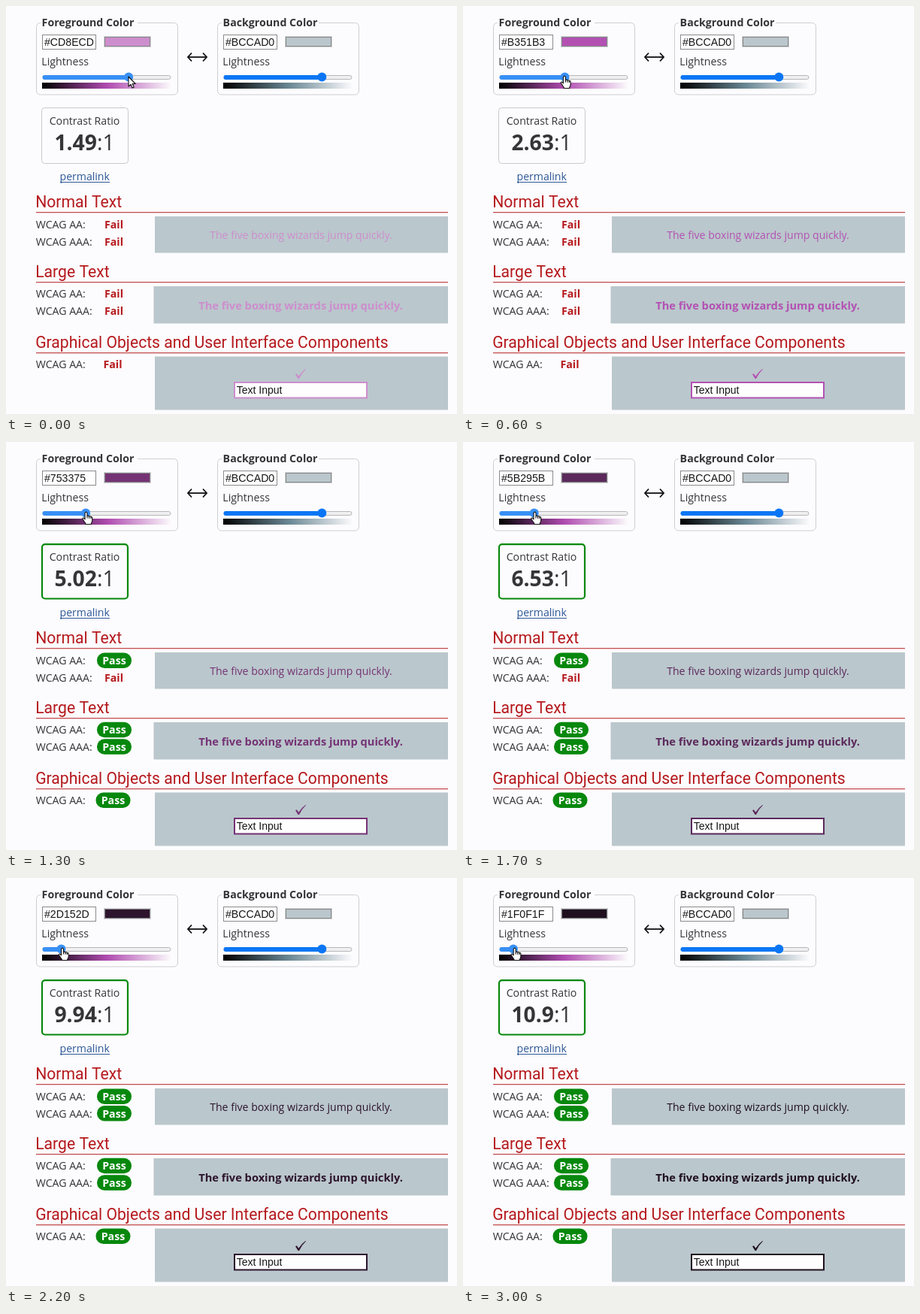
Write an HTML page with a canvas that moves like this. It is 600 px wide and 543 px high and loops after 3.1 s.

```html
<!DOCTYPE html>
<html lang="en">
<head>
<meta charset="utf-8">
<title>Contrast checker</title>
<style>
html, body { margin: 0; width: 100%; height: 100%; overflow: hidden; background: #fcfbfd; }
canvas { display: block; }
</style>
</head>
<body>
<canvas id="stage" width="600" height="543"></canvas>
<script>
const ctx = document.getElementById('stage').getContext('2d');
const LOOP = 3100, STEP = 100;
const PAGE = '#fcfbfd', INK = '#353537', RED = '#b5191d', GREEN = '#07880d';
const BACK_RGB = [188, 202, 208], BACK = '#bac7cc';
const SANS = '"Open Sans", sans-serif', HEAD = 'Roboto, sans-serif';
const FIELD = '"Liberation Sans", Arial, sans-serif';
const SENTENCE = 'The five boxing wizards jump quickly.';

// time in ms, lightness in percent, saturation
const KEYS = [
  [0, 68, .386], [300, 60, .392], [900, 42, .392], [1300, 33, .392],
  [1700, 26, .377], [2200, 13, .36], [3000, 9, .35]
];

function sample(t) {
  const i = Math.max(1, KEYS.findIndex(key => key[0] >= t));
  const a = KEYS[i - 1], b = KEYS[i];
  const u = (t - a[0]) / (b[0] - a[0]);
  return [Math.round(a[1] + (b[1] - a[1]) * u) / 100, a[2] + (b[2] - a[2]) * u];
}

function purple(light, sat) {
  const spread = sat * Math.min(light, 1 - light);
  const high = Math.round((light + spread) * 255);
  const low = Math.round((light - spread) * 255);
  return [high, low, high];
}

const toHex = rgb => '#' + rgb.map(v => v.toString(16).padStart(2, '0')).join('').toUpperCase();

function luminance(rgb) {
  const [r, g, b] = rgb.map(v => {
    v /= 255;
    return v <= .03928 ? v / 12.92 : ((v + .055) / 1.055) ** 2.4;
  });
  return .2126 * r + .7152 * g + .0722 * b;
}

const contrast = rgb =>
  Math.floor((luminance(BACK_RGB) + .05) / (luminance(rgb) + .05) * 100) / 100;

function text(str, x, y, color = INK, font = '14.1px ' + SANS, align = 'left') {
  ctx.font = font;
  ctx.fillStyle = color;
  ctx.textAlign = align;
  ctx.fillText(str, x, y);
}

function rect(x, y, w, h, color) {
  ctx.fillStyle = color;
  ctx.fillRect(x, y, w, h);
}

function rounded(x, y, w, h, r, fill, stroke, width = 1) {
  ctx.beginPath();
  ctx.roundRect(x, y, w, h, r);
  if (fill) { ctx.fillStyle = fill; ctx.fill(); }
  if (stroke) { ctx.strokeStyle = stroke; ctx.lineWidth = width; ctx.stroke(); }
}

function line(points, color, width) {
  ctx.beginPath();
  points.forEach(([x, y]) => ctx.lineTo(x, y));
  ctx.strokeStyle = color;
  ctx.lineWidth = width;
  ctx.stroke();
}

function slider(x, thumb, color) {
  rounded(x + .5, 92.5, 170, 5, 2.5, '#efeff0', '#b6b6b8');
  rounded(x, 92, thumb - x, 6, 3, color);
  ctx.beginPath();
  ctx.arc(thumb, 94.5, 6, 0, Math.PI * 2);
  ctx.fill();
}

function colorPanel(x, title, hex, swatch, middle, thumb, accent) {
  rounded(x + .5, 22.5, 188, 95.5, 5, null, '#cfced2');
  rect(x + 6, 20, 129, 5, PAGE);
  text(title, x + 7.6, 27, INK, 'bold 14.2px ' + SANS);

  rect(x + 8, 38, 72, 20, '#8a8a8c');
  rect(x + 9, 39, 70, 18, '#fff');
  ctx.save();
  ctx.beginPath();
  ctx.rect(x + 9, 39, 67.5, 18);
  ctx.clip();
  text(hex, x + 11, 53, '#161616', '14.15px ' + FIELD);
  ctx.restore();

  rect(x + 90, 40, 63, 15, '#d3d3d6');
  rect(x + 91, 41, 61, 13, '#858588');
  rect(x + 92, 42, 59, 11, swatch);

  text('Lightness', x + 7.3, 79, INK, '14.2px ' + SANS);
  const ramp = ctx.createLinearGradient(x + 8, 0, x + 180, 0);
  ramp.addColorStop(0, '#000');
  ramp.addColorStop(.5, middle);
  ramp.addColorStop(1, PAGE);
  rect(x + 8, 102, 172, 8, ramp);
  slider(x + 8.5, thumb, accent);
}

function swapArrow() {
  line([[242, 68], [267, 68]], '#111', 1.8);
  line([[247, 62.5], [242, 68], [247, 73.5]], '#111', 1.8);
  line([[262, 62.5], [267, 68], [262, 73.5]], '#111', 1.8);
}

function ratioBox(ratio) {
  if (ratio >= 4.5) rounded(48, 136.2, 114, 72.3, 4, null, GREEN, 2.2);
  else rounded(47.5, 135.5, 115, 74, 4, null, '#c9c9cc');
  text('Contrast Ratio', 104.5, 158, INK, '14.15px ' + SANS, 'center');

  const bold = 'bold 28.3px ' + SANS, plain = '28.3px ' + SANS;
  const value = String(ratio);
  ctx.font = bold;
  const valueWidth = ctx.measureText(value).width;
  ctx.font = plain;
  const left = 104.5 - (valueWidth + ctx.measureText(':1').width) / 2;
  text(value, left, 192, INK, bold);
  text(':1', left + valueWidth, 192, INK, plain);

  text('permalink', 104.7, 232, '#2c5796', '14.1px ' + SANS, 'center');
  rect(72, 234, 66, 1, '#2c5796');
}

function heading(title, y) {
  text(title, 39.2, y, RED, '21.15px ' + HEAD);
  rect(40, y + 6, 548, 1.3, '#c44f52');
}

function verdict(label, y, passed, x = 121) {
  text(label, 39.8, y);
  const font = 'bold 14.2px ' + SANS;
  if (passed) {
    rounded(x, y - 15.5, 46, 20.5, 10, GREEN);
    text('Pass', x + 23, y, '#fff', font, 'center');
  } else {
    text('Fail', x + 10, y, RED, font);
  }
}

function checkMark(color) {
  ctx.beginPath();
  ctx.moveTo(385, 490.3);
  ctx.lineTo(386.8, 489.2);
  ctx.lineTo(389.3, 492.8);
  ctx.quadraticCurveTo(393, 486.8, 398.4, 483);
  ctx.lineTo(399, 483.6);
  ctx.quadraticCurveTo(393.5, 488.5, 390, 496);
  ctx.lineTo(388.6, 496);
  ctx.closePath();
  ctx.fillStyle = color;
  ctx.fill();
}

function cursor(shape, x, y) {
  ctx.save();
  ctx.translate(x, y);
  const path = new Path2D(shape);
  ctx.lineJoin = 'round';
  ctx.fillStyle = '#fff';
  ctx.fill(path);
  ctx.strokeStyle = '#111';
  ctx.lineWidth = 1.1;
  ctx.stroke(path);
  ctx.restore();
}

const POINTER = 'M0 0V13L3 10.3L5 15L7.2 14L5.2 9.5H9.2Z';
const HAND = 'M-1.5 1.5Q0-1.3 1.5 1.5V5.5Q3.2 4.6 4 6Q5.7 5.2 6.3 6.8Q8 6.2 8.2 8V11.5' +
  'Q8 13.5 6.8 15V16.5H-.8V15Q-3 12.5-4.6 9.6Q-5.2 7.7-3.2 8L-1.5 9.8Z' +
  'M1.5 5.5V8.5M4 6V8.7M6.3 6.8V9';

function draw(t) {
  const [light, sat] = sample(t);
  const rgb = purple(light, sat), color = toHex(rgb), ratio = contrast(rgb);
  const thumb = 52.3 + 163 * light;

  rect(0, 0, 600, 543, PAGE);
  colorPanel(40, 'Foreground Color', color, color, 'hsl(300 40% 49%)', thumb, '#378ff5');
  colorPanel(281, 'Background Color', toHex(BACK_RGB), BACK, 'hsl(198 17% 49%)', 420.3, '#0a76f5');
  swapArrow();
  ratioBox(ratio);

  heading('Normal Text', 268);
  verdict('WCAG AA:', 296, ratio >= 4.5);
  verdict('WCAG AAA:', 318.5, ratio >= 7);
  rect(198, 280, 390, 48.5, BACK);
  text(SENTENCE, 392.5, 309.5, color, '14.1px ' + SANS, 'center');

  heading('Large Text', 361);
  verdict('WCAG AA:', 388.3, ratio >= 3);
  verdict('WCAG AAA:', 410.8, ratio >= 4.5);
  rect(196.5, 373, 391.5, 49.5, BACK);
  text(SENTENCE, 392, 403.5, color, 'bold 14.65px ' + SANS, 'center');

  heading('Graphical Objects and User Interface Components', 455);
  verdict('WCAG AA:', 482, ratio >= 3, 119.5);
  rect(198, 466.5, 390, 71, BACK);
  checkMark(color);
  rect(303, 500, 178, 22.5, color);
  rect(305, 502, 174, 18.5, '#fefefe');
  text('Text Input', 306.7, 516, '#161616', '14px ' + FIELD);

  if (t < STEP) cursor(POINTER, 163, 94);
  else cursor(HAND, thumb + 2.2 - 5.3 * light, 93);
}

function tick(now) {
  draw(Math.floor(now % LOOP / STEP) * STEP);
  requestAnimationFrame(tick);
}
requestAnimationFrame(tick);
</script>
</body>
</html>
```
